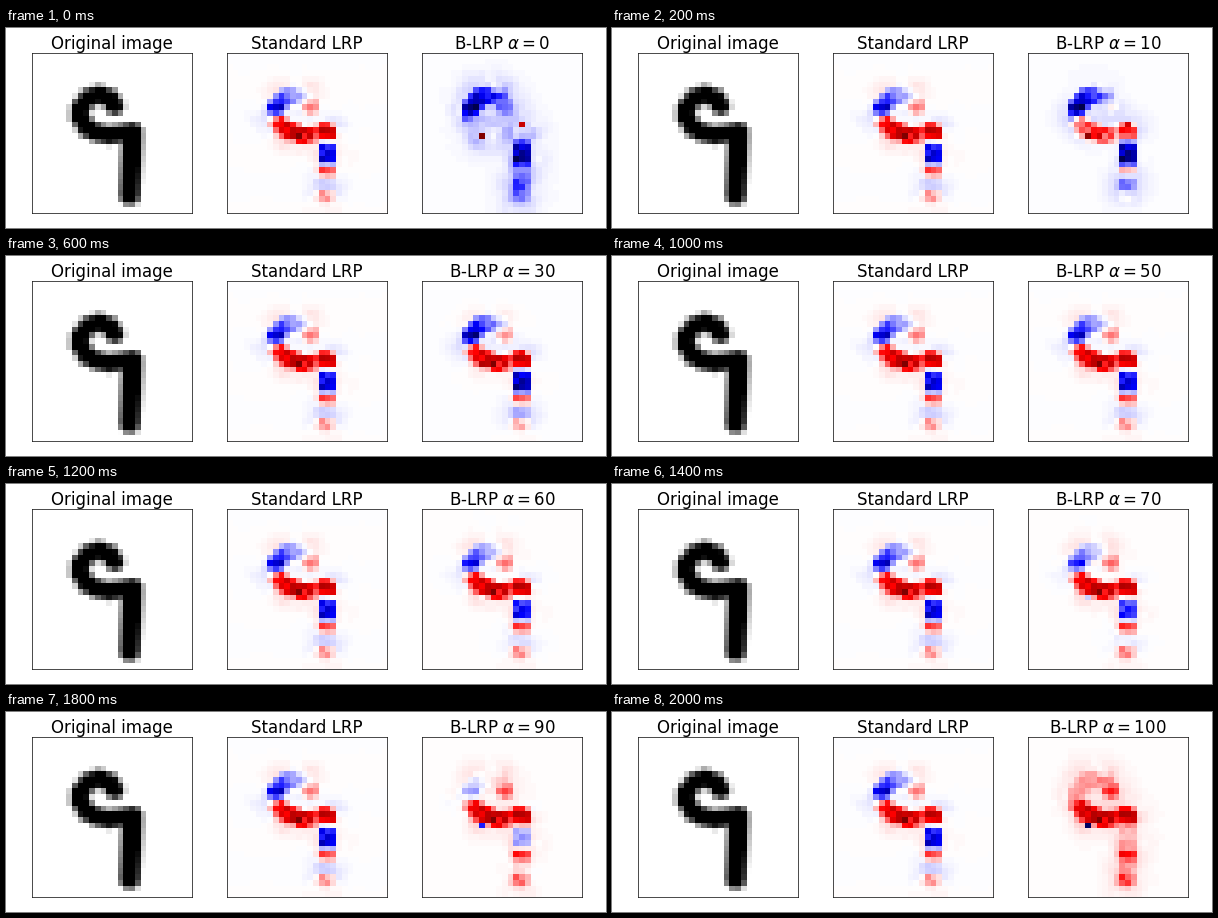
Animation, 600 px wide and 200 px high, one loop 2.1 s. Source, as a matplotlib script:

```python
import numpy as np
import matplotlib.pyplot as plt
from matplotlib.animation import FuncAnimation

plt.rcParams["font.family"] = "DejaVu Sans"
plt.rcParams["mathtext.fontset"] = "dejavusans"

N = 28
FRAMES = 21
STEP = 5
TAIL = 0.014
Y, X = np.mgrid[0:N, 0:N].astype(float)
rng = np.random.default_rng(9)

# Pen path of the digit: hook, then stem
PATH = [(14, 8.7), (13, 7.4), (11.2, 6.8), (9.4, 7.4), (8, 9), (7.9, 10.6), (9, 12.5),
        (11, 13.5), (13, 13.9), (15.2, 13.6), (17.1, 13.3), (16.6, 24.3)]

# Sign and strength of the median relevance along the pen path
AT = [0, 2, 5, 8, 10, 12, 15, 17.5, 19, 20.6, 23, 25, 26.5, 29, 31]
WAVE = [0.2, -0.1, -0.3, -0.6, 0.45, 0.6, 0.8, 0.35, 0.75, 0.5, -0.9, -0.4, 0.35, -0.2, 0.25]


def trace(path):
    """Distance of each cell to the path, and path length at the nearest point."""
    dist, along, start = np.full((N, N), 99.0), np.zeros((N, N)), 0
    for (x0, y0), (x1, y1) in zip(path, path[1:]):
        dx, dy = x1 - x0, y1 - y0
        length = np.hypot(dx, dy)
        t = np.clip(((X - x0) * dx + (Y - y0) * dy) / length**2, 0, 1)
        d = np.hypot(X - x0 - t * dx, Y - y0 - t * dy)
        along = np.where(d < dist, start + t * length, along)
        dist = np.minimum(d, dist)
        start += length
    return dist, along


def smooth(a):
    for axis in (0, 1):
        a = (np.roll(a, 1, axis) + 2 * a + np.roll(a, -1, axis)) / 4
    return a


dist, along = trace(PATH)
on_stem = np.clip((along - 18) / 3, 0, 1)
digit = np.clip((2.2 + 0.15 * on_stem - dist) / 1.2, 0, 1)

noise = rng.normal(size=(N, N))
grain = smooth(noise)
near = np.exp(-(dist / 3.2) ** 2)
ink = np.clip(1.9 - dist, 0, 1) * np.clip(1 + 0.22 * noise, 0.4, 1.5)
halo = 0.075 * near * np.clip(1 + 1.2 * grain, 0.1, 2.2) + 0.004
bands = 0.06 * near * (np.cos(2 * np.pi * (Y - 17) / 11.5) + grain)

wave = np.interp(along, AT, WAVE)
pos, neg = np.maximum(wave, 0), np.minimum(wave, 0)
mid = ink * wave + (1 - ink) * bands
low = ink * (-0.25 + 0.3 * pos + 0.6 * neg) - (1 - ink) * halo
high = ink * (0.25 + 0.8 * pos + 0.1 * neg) + (1 - ink) * halo

# Stray cells that oppose the trend at both extremes
low[14, 10], low[12, 17], high[15, 10] = 0.7, 0.5, -1


def unit(field):
    return field / np.abs(field).max()


def relevance(alpha):
    """Field at a percentile, with near-normal spread between the extremes."""
    p = np.clip(alpha / 100, TAIL, 1 - TAIL)
    z = np.log(p / (1 - p)) / np.log((1 - TAIL) / TAIL)
    return unit(mid + abs(z) * ((high if z > 0 else low) - mid))


fig = plt.figure(figsize=(6, 2), dpi=100, facecolor="white")


def panel(col, title, data, cmap, lo):
    left = 26.1 + 195 * col
    ax = fig.add_axes([left / 600, 14.8 / 200, 160 / 600, 160 / 200])
    img = ax.imshow(data, cmap=cmap, vmin=lo, vmax=1, interpolation="nearest")
    ax.set(xticks=[], yticks=[])
    for spine in ax.spines.values():
        spine.set_linewidth(0.5)
    return img, ax.set_title(title, fontsize=12, pad=2.8)


panel(0, "Original image", digit, "gray_r", 0)
panel(1, "Standard LRP", unit(mid), "seismic", -1)
heat, label = panel(2, "", relevance(0), "seismic", -1)


def update(i):
    alpha = STEP * i
    heat.set_data(relevance(alpha))
    label.set_text(rf"B-LRP $\alpha={alpha}$")
    return heat, label


anim = FuncAnimation(fig, update, frames=FRAMES, interval=100, repeat=True, blit=False)
plt.show()
```
